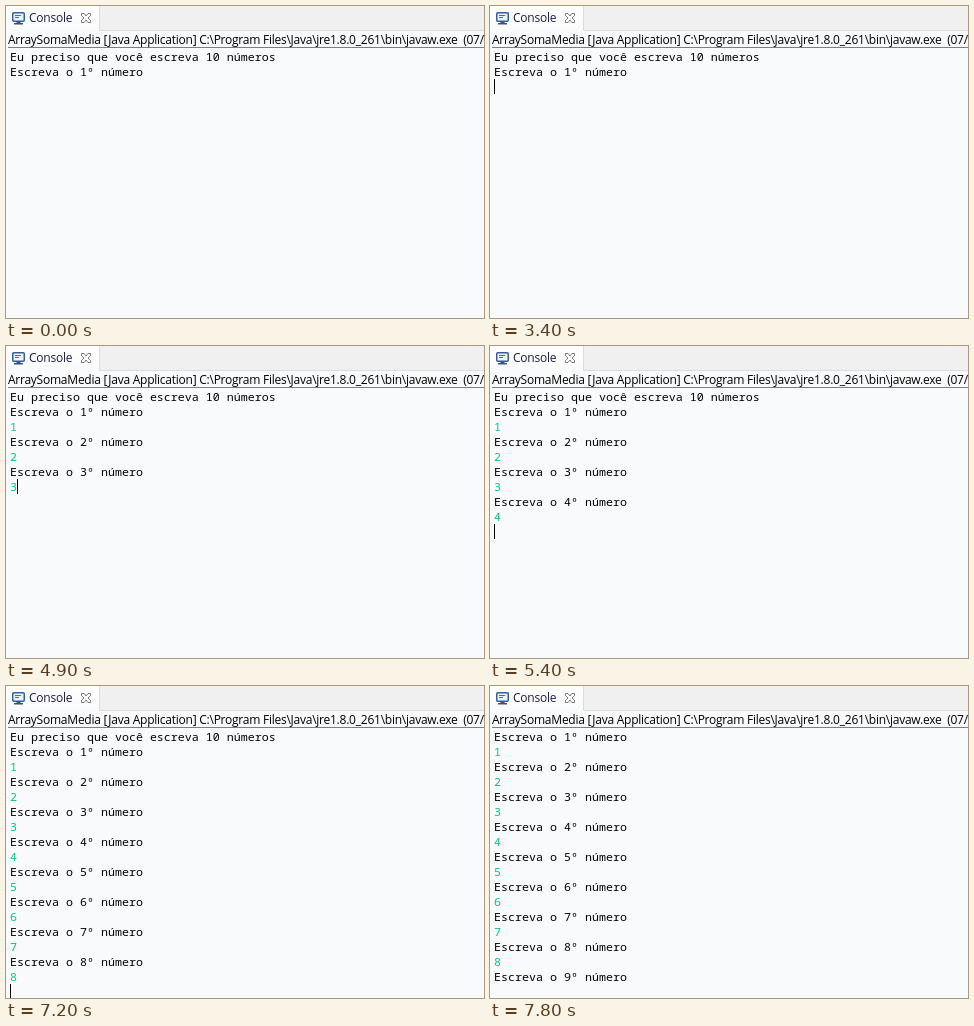
Animation of 478 by 312 pixels, one loop 8000 ms. Source, as an HTML page:

```html
<!DOCTYPE html>
<html lang="pt-BR">
<head>
<meta charset="utf-8">
<title>Console</title>
<style>
  html, body { margin: 0; width: 100%; height: 100%; overflow: hidden; background: #f9fafb; }
  svg { display: block; }
  text { white-space: pre; }
  .ui { font: 12px "Open Sans", "Noto Sans", sans-serif; letter-spacing: -.25px; }
  .mono { font: 11.667px "Noto Sans Mono", "Liberation Mono", monospace; fill: #000; }
  .input { fill: #00c87d; }
</style>
</head>
<body>
<svg width="478" height="312" viewBox="0 0 478 312">
  <defs>
    <linearGradient id="tab" x2="0" y2="1">
      <stop stop-color="#fff"/>
      <stop offset="1" stop-color="#f9fafb"/>
    </linearGradient>
  </defs>
  <rect width="478" height="312" fill="#f9fafb"/>
  <rect width="478" height="24" fill="#f0f0f0"/>
  <path d="M0 0H93V25H0Z" fill="url(#tab)"/>
  <path d="M93.5 0V24.5H478" fill="none" stroke="#dcdcdc"/>

  <g id="monitor">
    <rect x="6.75" y="6.75" width="11.5" height="8.5" rx="1" fill="#eef4fc" stroke="#2f5f9e" stroke-width="1.5"/>
    <path d="M9 9.5H15M9 11.5H13" stroke="#3b6fb5"/>
    <path d="M10.5 16H14.5V17H17V18.5H8V17H10.5Z" fill="#3f5474"/>
  </g>
  <text class="ui" x="23" y="16" fill="#1e1e46">Console</text>
  <path d="M75.5 7.5H78L80 10L82 7.5H84.5V9.5L82 12L84.5 14.5V16.5H82L80 14L78 16.5H75.5V14.5L78 12L75.5 9.5Z"
        fill="#fff" stroke="#6e6e6e" stroke-width=".9"/>

  <text class="ui" x="2" y="38">ArraySomaMedia [Java Application] C:\Program Files\Java\jre1.8.0_261\bin\javaw.exe  (07/</text>
  <path d="M2 41.5H478" stroke="#7c7f82"/>

  <g id="lines"></g>
  <rect id="caret" width="1" height="15"/>
</svg>
<script>
  const LOOP = 8000, TOP = 43, LEFT = 4, LINE = 15, CHAR = 7, ROWS = 18;

  // When each number is typed, Enter moves the caret, and the next prompt prints.
  const typed   = [4000, 4400, 4900, 5200, 5700, 6100, 6600, 7000];
  const entered = [4100, 4500, 5000, 5400, 5800, 6200, 6700, 7200];
  const printed = [4200, 4600, 5100, 5500, 5800, 6200, 6800, 7300];
  const blinks  = [500, 1000, 1500, 2000, 2500, 2900, 3400, 3900, 4000, 7800];

  const count = (times, t) => times.filter(x => x <= t).length;
  const caret = document.getElementById("caret");
  const group = document.getElementById("lines");

  function addLine(row) {
    const el = document.createElementNS("http://www.w3.org/2000/svg", "text");
    const isInput = row > 0 && row % 2 === 0;
    el.setAttribute("class", isInput ? "mono input" : "mono");
    el.setAttribute("x", LEFT);
    el.textContent = row === 0 ? "Eu preciso que você escreva 10 números"
      : isInput ? row / 2
      : `Escreva o ${(row + 1) / 2}º número`;
    group.append(el);
    return el;
  }
  const lines = Array.from({ length: ROWS }, (_, row) => addLine(row));

  function draw(t) {
    const inputs = count(typed, t), enters = count(entered, t), prompts = count(printed, t);
    const scroll = prompts === 8 ? 1 : 0;

    lines.forEach((el, row) => {
      const shown = row < 2 || (row % 2 ? (row - 1) / 2 <= prompts : row / 2 <= inputs);
      el.setAttribute("y", TOP + 12 + LINE * (row - scroll));
      el.setAttribute("visibility", shown && row >= scroll ? "visible" : "hidden");
    });

    const typing = inputs > enters;
    const row = inputs === 0 ? 2 : typing ? 2 * inputs : 2 * inputs + 1;
    caret.setAttribute("x", LEFT + (typing ? CHAR : 0));
    caret.setAttribute("y", TOP + LINE * (row - scroll));
    caret.setAttribute("visibility", count(blinks, t) % 2 ? "visible" : "hidden");
  }

  const start = performance.now();
  function tick() {
    draw((performance.now() - start) % LOOP);
    requestAnimationFrame(tick);
  }
  tick();
</script>
</body>
</html>
```
